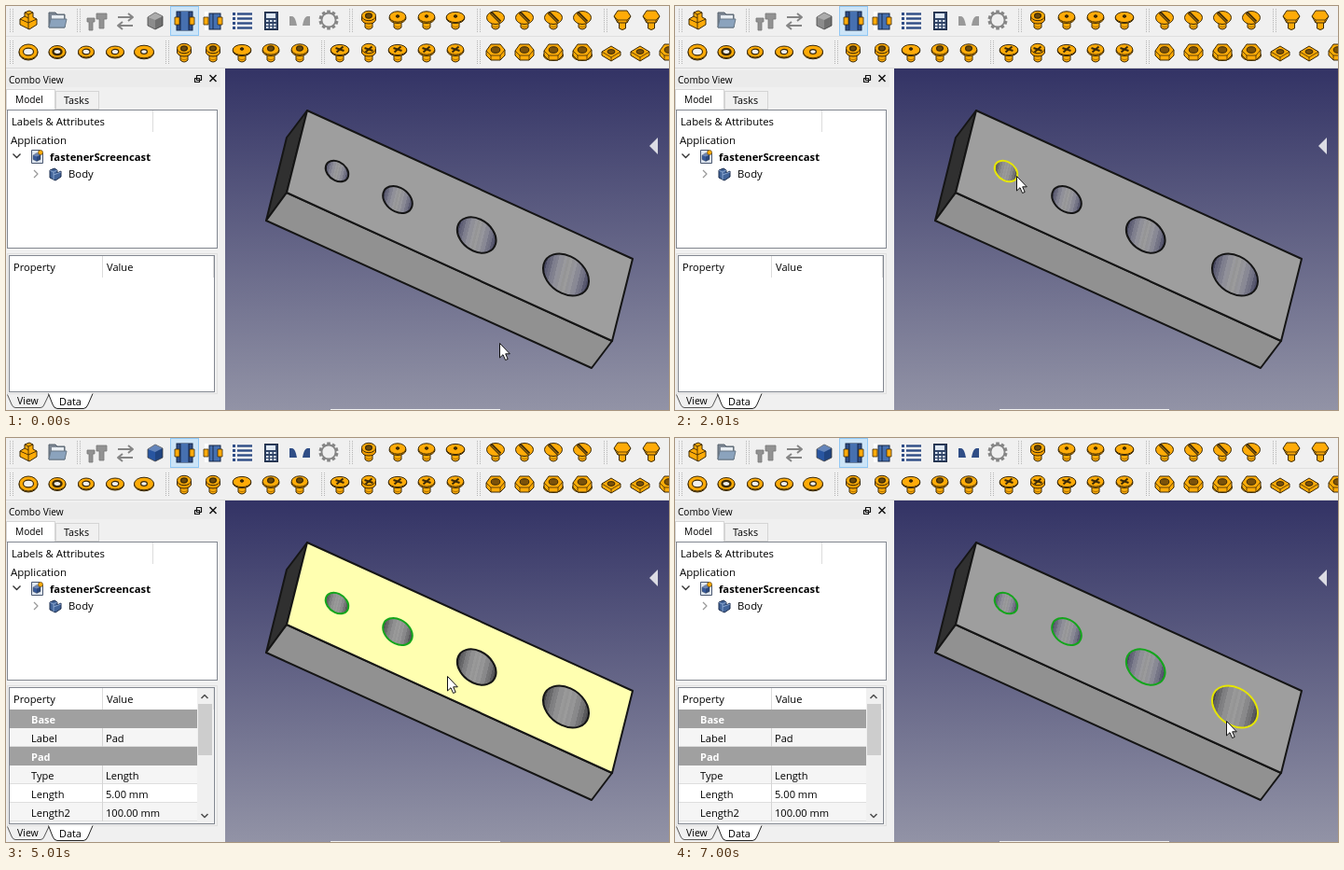
An HTML page for the animation above (8000 ms loop, 711 by 433 pixels).

```html
<!DOCTYPE html>
<html lang="en">
<head>
<meta charset="utf-8">
<title>Selecting holes</title>
<style>
  html, body { margin: 0; width: 100%; height: 100%; overflow: hidden; background: #f0f0f0; }
  svg { display: block; width: 711px; height: 433px; }
  text { font-family: "Open Sans", "Noto Sans", sans-serif; white-space: pre; }
</style>
</head>
<body>
<svg id="stage" viewBox="0 0 711 433" xmlns="http://www.w3.org/2000/svg"></svg>
<script>
const LOOP = 8000;
const INK = '#3b2a08', ORANGE = '#ffab08', BLUE = '#2f4d86', GREY = '#929292';

const STATES = [
  { at: 0,    cursor: [530, 361], selected: 0 },
  { at: 1000, cursor: [391, 218], selected: 0, face: true },
  { at: 2010, cursor: [367, 182], selected: 0, hover: 0 },
  { at: 3000, cursor: [367, 182], selected: 1 },
  { at: 4010, cursor: [425, 220], selected: 1, hover: 1 },
  { at: 5010, cursor: [474, 255], selected: 2, face: true },
  { at: 6000, cursor: [517, 261], selected: 3 },
  { at: 7000, cursor: [592, 303], selected: 3, hover: 3 }
];

// Centre and relative radius
const HOLES = [[355, 177, .5], [420, 207.5, .645], [504.7, 245.5, .85], [600.5, 288, 1]];

const rect = (x, y, w, h, fill, extra = '') =>
  `<rect x="${x}" y="${y}" width="${w}" height="${h}" fill="${fill}" ${extra}/>`;
const box = (x, y, w, h, fill, stroke) => rect(x + .5, y + .5, w - 1, h - 1, fill, `stroke="${stroke}"`);
const path = (d, fill, stroke = 'none', width = 1, extra = '') =>
  `<path d="${d}" fill="${fill}" stroke="${stroke}" stroke-width="${width}" stroke-linejoin="round" ${extra}/>`;
const oval = (x, y, rx, ry, fill, stroke = INK, width = 1) =>
  `<ellipse cx="${x}" cy="${y}" rx="${rx}" ry="${ry}" fill="${fill}" stroke="${stroke}" stroke-width="${width}"/>`;
const text = (x, y, str, size = 11.3, extra = '') =>
  `<text x="${x}" y="${y}" font-size="${size}" ${extra}>${str}</text>`;
const at = (x, y, body) => `<g transform="translate(${x} ${y})">${body}</g>`;

// Toolbar icons, drawn around their own centre
const DRIVES = {
  socket: oval(0, -4.5, 3.4, 2.6, '#6b4a0c', INK, 1.2),
  dot: oval(0, -4, 1.8, 1.3, INK),
  slot: path('M-5-8L5 2', 'none', INK, 3.4) + path('M-4.5-7L4.5 2', 'none', '#c98a10', 1),
  cross: path('M-4.5-5L4.5-2M3.5-6.5L-3.5-.5', 'none', INK, 2)
};
const shank = path('M-4 0V8Q0 12 4 8V0Z', ORANGE, INK) + path('M-4 6.5Q0 9 4 6.5', 'none', '#9a6500', .8);
const capScrew = drive => shank + path('M-7.5-4V0Q-6 4 0 4Q6 4 7.5 0V-4Z', '#f09c00', INK) +
  oval(0, -4.5, 7.5, 5.2, ORANGE) + DRIVES[drive];
const domeScrew = drive => shank + oval(0, -2, 9, 5.5, '#f09c00') + oval(0, -3.5, 8.8, 5.7, ORANGE) + DRIVES[drive];
const flatScrew = drive => shank + oval(0, -2, 9.8, 5.6, '#f09c00') + oval(0, -3, 9.8, 5.6, ORANGE) + DRIVES[drive];
const slotScrew = shank + oval(0, -2.5, 9.5, 7, ORANGE) + DRIVES.slot;
const hexScrew = path('M-3.5 0V9Q0 12 3.5 9V0Z', ORANGE, INK) +
  path('M-9-4L-5-10H5L9-4L5 3H-5Z', ORANGE, INK) + path('M-9-4L-5 0H5L9-4M-5 0V3M5 0V3', 'none', INK, .8);
const washer = (rx, ry, hole, line = 1.2) => oval(0, 1, rx, ry, '#c98200') + oval(0, 0, rx, ry, ORANGE) +
  oval(0, 0, hole, hole * .7, '#f0f0f0', INK, line);
const hexNut = flange => (flange ? oval(0, 4, 10.5, 5.5, ORANGE) : '') +
  path('M-10-1L-5-8H5L10-2V4L5 9H-5L-10 4Z', ORANGE, INK) +
  path('M-10-1L-5 4H5L10-2M-5 4V9M5 4V9', 'none', INK, .8) + oval(0, -2, 4.8, 3.3, '#7b520a');
const squareNut = path('M-10 0L0-6L10 0V4L0 10L-10 4Z', ORANGE, INK) +
  path('M-10 0L0 6L10 0M0 6V10', 'none', INK, .8) + oval(0, 0, 4, 2.4, '#7b520a');

const cube = color => path('M-8-4L0-9L8-5V5L0 9L-8 5Z', color, '#444', .8) +
  path('M-8-4L0-1L8-5L0-9Z', '#fff', 'none', 0, 'opacity=".28"') +
  path('M0-1V9L8 5V-5Z', '#000', 'none', 0, 'opacity=".2"');
const mirror = color => path('M-11-5H-8C-5-4-4 0-3 5H-11ZM11-5H8C5-4 4 0 3 5H11Z', color);
const blocks = path('M-9-1L-4-4V-8L1-10L5-8V-3L9-1V5L1 10L-9 5Z', ORANGE, INK) +
  path('M-9-1L0 3L9-1M0 3V10M-4-8L0-6L5-8M0-6V3M-4-4L0-2', 'none', INK, .9);
const folder = path('M-9-8H-2L0-6H8V8H-9Z', '#7d8794', '#55606c') +
  path('M-6-5H7V2H-6Z', '#e8edf2') + path('M-7-1H10L8 8H-9Z', '#8ba3bd', '#687887');
const greyBolts = path('M-10-3H-2V1H-4V10H-8V1H-10ZM0-8H11V-2H8V8H3V-2H0Z', GREY, '#777', .8);
const swap = path('M-8-4H7M3-8L8-4L3 0M8 5H-7M-3 1L-8 5L-3 9', 'none', '#858585', 2);
const hole = rect(-8, -10, 17, 20, BLUE, 'stroke="#142748"') + rect(-4, -10, 9, 20, '#4670b0') +
  path('M-4-10V10M5-10V10', 'none', '#142748') +
  path('M-10-4H-5V4H-10ZM6-4H11V4H6Z', ORANGE, INK, .8);
const holeHalf = rect(-4, -8, 12, 17, '#4670b0', 'stroke="#142748"') + rect(-9, -10, 4, 20, '#fff') +
  path('M-10-4H-5V4H-10ZM5-4H10V4H5Z', ORANGE, INK, .8) + path('M0-8V9', 'none', '#142748');
const list = [-7.5, -2.5, 2.5, 7.5].map(y =>
  rect(-10, y - 1.5, 3, 3, BLUE) + rect(-5, y - 1.2, 16, 2.4, BLUE)).join('');
const calculator = box(-7, -10, 15, 20, '#314568', '#1e2c45') + rect(-5, -8, 10, 5, '#dfe8f2') +
  [-1, 3, 6].map(y => [-5, -1, 3].map(x => rect(x, y, 2.5, 2, '#dfe8f2')).join('')).join('');
const gear = [...Array(10)].map((_, i) =>
  rect(-1.8, -10.5, 3.6, 4, '#858585', `transform="rotate(${i * 36})"`)).join('') +
  oval(0, 0, 7.5, 7.5, '#efefef', '#858585', 1.8);

const row = (x, y, icons) => icons.map((icon, i) => at(x + i * 31, y, icon)).join('');
const grip = (x, y) =>
  path(`M${x + 1.5} ${y - 12}v25M${x + 4.5} ${y - 12}v25`, 'none', '#b4b4b4', 1, 'stroke-dasharray="1 1"');

function toolbars() {
  return rect(0, 0, 711, 67, '#f0f0f0') +
    rect(0, 32, 711, 1, '#dfdfdf') + rect(0, 66, 711, 1, '#d8d8d8') +
    [3, 75, 367, 504, 640].map(x => grip(x, 15)).join('') +
    [3, 170, 337, 504].map(x => grip(x, 49)).join('') +
    box(176, 0, 31, 32, '#cce4f7', '#90c8f6') +
    row(24, 15, [blocks, folder]) + row(97, 16, [greyBolts, swap]) +
    `<g id="iconsOff">${at(160, 16, cube('#8c8c8c'))}${at(315, 16, mirror('#999'))}</g>` +
    `<g id="iconsOn">${at(160, 16, cube('#2855a0'))}${at(315, 16, mirror(BLUE))}</g>` +
    row(191, 16, [hole, holeHalf, list, calculator]) + at(346, 15, gear) +
    row(389, 15, [capScrew('socket'), domeScrew('dot'), domeScrew('dot'), flatScrew('dot')]) +
    row(525, 15, [slotScrew, slotScrew, slotScrew, slotScrew]) +
    row(661, 15, [hexScrew, hexScrew]) +
    row(24, 49, [washer(10, 8, 5.5), washer(9, 6.5, 4.5, 2.4), washer(8.5, 6, 4), washer(9.5, 6, 3.8), washer(10.5, 6.8, 3.4)]) +
    row(191, 50, [capScrew('socket'), capScrew('socket'), flatScrew('dot'), domeScrew('socket'), domeScrew('socket')]) +
    row(358, 50, [flatScrew('cross'), capScrew('cross'), flatScrew('cross'), domeScrew('cross'), domeScrew('cross')]) +
    row(525, 49, [hexNut(), hexNut(), hexNut(true), hexNut(true), squareNut, squareNut, hexNut()]);
}

function propertyRows() {
  const rows = [['Base'], ['Label', 'Pad'], ['Pad'], ['Type', 'Length'], ['Length', '5.00 mm'], ['Length2', '100.00 mm']];
  const cells = rows.map(([name, value], i) => {
    const y = 291 + i * 20;
    if (!value) return rect(4, y, 201, 20, '#a0a0a0') + text(27, y + 15, name, 11, 'font-weight="700" fill="#fff"');
    return rect(4, y, 201, 20, i % 2 ? '#f5f5f5' : '#fff') +
      rect(4, y + 19, 201, 1, '#dedede') + rect(103, y, 1, 20, '#d4d4d4') +
      text(27, y + 15, name, 11.1) + text(107, y + 15, value, 11.1);
  }).join('');
  return `<g id="properties">${cells}` + rect(205, 268, 17.5, 145, '#f0f0f0') + rect(206, 285, 15, 55, '#cdcdcd') +
    path('M209.5 279L213 275.5L216.5 279M209.5 403L213 406.5L216.5 403', 'none', '#505050', 1.6) + '</g>';
}

function sidePanel() {
  const dock = rect(0, 67, 235, 366, '#f0f0f0') + rect(0, 69, 230, 18, '#ebebeb') +
    text(3, 83, 'Combo View', 10.1) +
    path('M204.5 74.5H209.5V79.5H204.5ZM202.5 77.5H207.5V81.5H202.5Z', '#f0f0f0', '#111', 1.2) +
    path('M218.5 74L225.5 81M225.5 74L218.5 81', 'none', '#111', 1.5);
  const tabs = box(53, 91, 47, 20, '#f0f0f0', '#d5d5d5') + box(0, 89, 53, 23, '#fff', '#d5d5d5') +
    text(10, 104, 'Model', 10.2) + text(62, 105, 'Tasks', 10.8);
  const tree = box(1, 111, 226, 149, '#fff', '#828790') + rect(157, 112, 1, 23, '#dcdcdc') +
    text(6, 128, 'Labels &amp; Attributes') + text(5, 148, 'Application', 11.5) +
    path('M7.5 158.5L11.5 162.5L15.5 158.5', 'none', '#333', 1.4) +
    path('M30 176L34 180L30 184', 'none', '#999', 1.2) +
    path('M27.5 154.5H36L39.5 158V168.5H27.5Z', '#dfe7f2', '#4b5870') +
    at(33, 162, `<g transform="scale(.5)">${cube('#365999')}</g>`) + oval(37, 157, 2.5, 2.5, ORANGE, INK, .6) +
    text(47, 166, 'fastenerScreencast', 11.25, 'font-weight="700"') +
    path('M47 176L52 174L55 176V179L59 177V183L53 187L47 184Z', '#426499', '#192b4c') +
    path('M47 176L51 178L55 176M51 178V186M51 181L59 178', 'none', '#9bb5dc', .8) + text(67, 184, 'Body');
  const table = box(1, 265, 226, 151, '#f0f0f0', '#e0e0e0') + box(3, 267, 221, 147, '#fff', '#828790') +
    rect(103, 268, 1, 23, '#dcdcdc') + rect(222, 268, 1, 23, '#dcdcdc') +
    text(8, 284, 'Property', 11.1) + text(108, 284, 'Value', 11.1) + propertyRows();
  const footer = path('M1.5 416.5L6 427Q7.5 430.5 10 430.5H37Q40 430.5 41 427L46 416.5', '#f0f0f0', '#555') +
    path('M45.5 415.5L50 427Q51.5 431.5 55 431.5H83Q86.5 431.5 88 427L93 415.5', '#fff', '#222') +
    text(12, 427, 'View', 10.5) + text(57, 428, 'Data', 10.9);
  return dock + tabs + tree + table + footer;
}

// Facets of a hole wall: dark at both sides, pale in the middle
function wallGradient(id, tint) {
  const count = 18;
  const stops = [...Array(count)].map((_, i) => {
    const side = Math.abs((i + .5) / count * 2 - 1);
    const level = Math.round(152 - 88 * side ** 2.2 + (i % 2 ? 3 : -3));
    const color = `rgb(${level},${level},${level + Math.round(tint * side)})`;
    return [i, i + 1].map(k => `<stop offset="${k / count}" stop-color="${color}"/>`).join('');
  }).join('');
  return `<linearGradient id="${id}">${stops}</linearGradient>`;
}

function view() {
  const edge = '#151515';
  const holes = HOLES.map(([x, y, k]) =>
    `<circle class="hole" r="1" transform="translate(${x} ${y}) scale(${k}) matrix(24 10.9 -4.9 19.7 0 0)"
      stroke-width="2" vector-effect="non-scaling-stroke"/>`).join('');
  return `<defs><linearGradient id="sky" x2="0" y2="1"><stop stop-color="#333365"/>
    <stop offset="1" stop-color="#9293a6"/></linearGradient>${wallGradient('tinted', 26)}${wallGradient('plain', 3)}</defs>` +
    rect(235, 67, 476, 366, 'url(#sky)') +
    path('M323 112L301 200L279 230L301 141Z', '#303030', edge, 2) +
    path('M301 200L650 359L628 388L279 230Z', '#919191', edge, 2) +
    path('M323 112L672 271L650 359L301 200Z', '#9e9e9e', edge, 2, 'id="face"') +
    holes + path('M690 150L699 141V159Z', '#dcdce4') + rect(348, 432, 182, 1, '#f0f0f0') +
    `<g id="cursor">${path('M-.5.5V16L3 12.7L5.6 18.5L8.2 17.4L5.7 11.8H10.3Z', '#fff', '#111')}</g>`;
}

const stage = document.getElementById('stage');
stage.innerHTML = view() + sidePanel() + toolbars();
const find = id => document.getElementById(id);
const face = find('face'), cursor = find('cursor'), properties = find('properties');
const iconsOn = find('iconsOn'), iconsOff = find('iconsOff');
const holeNodes = [...stage.querySelectorAll('.hole')];
const show = (node, visible) => node.setAttribute('visibility', visible ? 'visible' : 'hidden');

function render(time) {
  const state = STATES.filter(s => s.at <= time).pop();
  face.setAttribute('fill', state.face ? '#ffffb0' : '#9e9e9e');
  holeNodes.forEach((node, i) => {
    const hovered = state.hover === i;
    node.setAttribute('fill', state.face || hovered ? 'url(#plain)' : 'url(#tinted)');
    node.setAttribute('stroke', hovered ? '#e6e600' : i < state.selected ? '#14a51c' : '#151515');
  });
  cursor.setAttribute('transform', `translate(${state.cursor})`);
  show(properties, state.selected > 0);
  show(iconsOn, time >= 4010);
  show(iconsOff, time < 4010);
}

const start = performance.now();
function tick() {
  render((performance.now() - start) % LOOP);
  requestAnimationFrame(tick);
}
tick();
</script>
</body>
</html>
```
